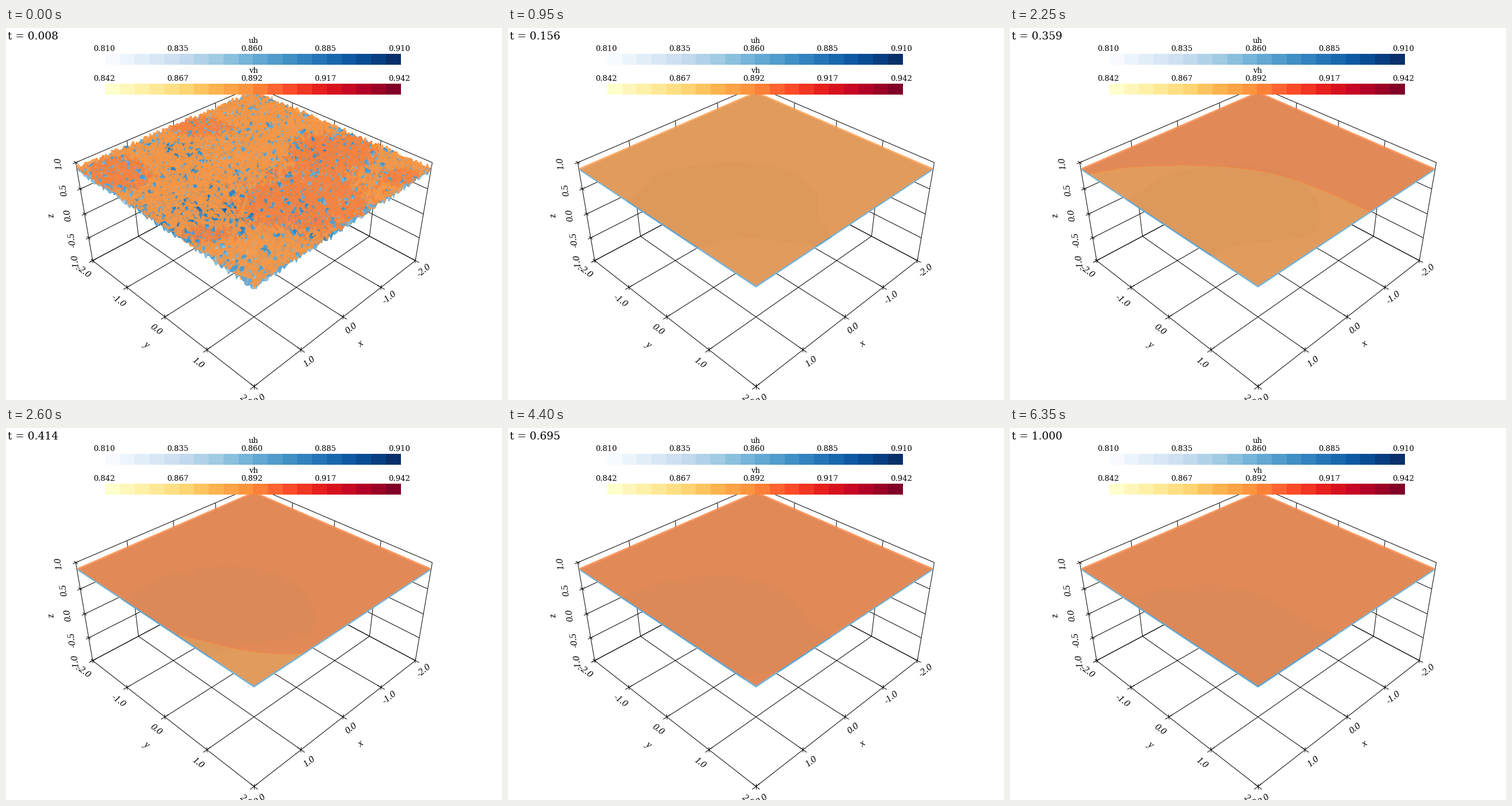
A matplotlib script that plays this animation: 864x648 px, repeating every 6400 ms.

```python
import numpy as np
import matplotlib.pyplot as plt
from matplotlib import colormaps
from matplotlib.animation import FuncAnimation
from matplotlib.collections import LineCollection, PolyCollection
from matplotlib.patches import Polygon, Rectangle
from matplotlib.path import Path

W, H, DPI = 864, 648, 100
FRAMES, STEP = 128, 50
BINS = 20
ROUGH = 8            # frames drawn with the noisy mesh
ALPHA = 0.8
U0, V0 = 0.860, 0.892
BLUES = colormaps["Blues"].resampled(BINS)
REDS = colormaps["YlOrRd"].resampled(BINS)

# isometric camera, 30 degree view angle, fitted to the box
DIST = 3 / np.sin(np.radians(15))
FOCAL = H / 2 / np.tan(np.radians(15))


def project(x, y, z):
    x, y, z = np.broadcast_arrays(x, y, z)
    w = FOCAL / (DIST - (x + y + z) / np.sqrt(3))
    return np.stack([W / 2 + w * (y - x) / np.sqrt(2),
                     H / 2 - w * (2 * z - x - y) / np.sqrt(6)], axis=-1)


def px(size):
    return size * 72 / DPI


def smooth(pts, n=14):
    """Catmull-Rom curve through the points."""
    p = np.vstack([2 * pts[0] - pts[1], pts, 2 * pts[-1] - pts[-2]])
    t = np.linspace(0, 1, n)[:, None]
    parts = []
    for a, b, c, d in zip(p, p[1:], p[2:], p[3:]):
        parts.append(0.5 * (2 * b + (c - a) * t + (2 * a - 5 * b + 4 * c - d) * t**2
                            + (3 * b - a - 3 * c + d) * t**3))
    return np.vstack(parts)


def blend(times, keys, ms):
    k = int(np.clip(np.searchsorted(times, ms) - 1, 0, len(times) - 2))
    f = np.clip((ms - times[k]) / (times[k + 1] - times[k]), 0, 1)
    a, b = np.array(keys[k], float), np.array(keys[k + 1], float)
    return smooth(a + (b - a) * f)


U_TIMES = [950, 1750, 3000, 4400, 6350]
U_KEYS = [
    [(195, 310), (228, 286), (265, 252), (390, 234), (490, 250), (537, 288),
     (543, 335), (575, 382), (520, 378), (435, 367), (375, 371), (315, 388)],
    [(195, 308), (228, 288), (270, 252), (390, 236), (490, 254), (537, 295),
     (541, 335), (525, 360), (490, 367), (430, 371), (380, 378), (330, 396)],
    [(190, 303), (225, 283), (285, 257), (385, 243), (470, 256), (522, 296),
     (536, 338), (525, 360), (490, 369), (430, 378), (392, 388), (350, 412)],
    [(190, 300), (220, 285), (285, 264), (370, 257), (440, 266), (495, 295),
     (528, 340), (575, 380), (500, 418), (455, 426), (432, 428), (405, 442)],
    [(185, 300), (215, 293), (270, 279), (345, 273), (410, 281), (465, 305),
     (525, 342), (580, 372), (520, 430), (470, 460), (440, 480), (380, 470)],
]
V_TIMES = [1300, 1750, 2250, 2800]
V_KEYS = [
    [(400, 85), (415, 95), (425, 102), (435, 105),
     (445, 105), (455, 100), (465, 95), (475, 90)],
    [(270, 160), (295, 178), (350, 192), (450, 201),
     (550, 208), (620, 218), (665, 214), (685, 205)],
    [(110, 262), (150, 252), (215, 242), (310, 239),
     (400, 244), (480, 259), (560, 289), (640, 326)],
    [(150, 330), (200, 370), (280, 410), (380, 450),
     (432, 470), (500, 470), (560, 440), (640, 380)],
]

fig = plt.figure(figsize=(W / DPI, H / DPI), dpi=DPI, facecolor="white")
ax = fig.add_axes([0, 0, 1, 1])
ax.set_xlim(0, W)
ax.set_ylim(H, 0)
ax.axis("off")


# ---- box, grid and ticks
def segment(a, b):
    return project(*np.array([a, b], float).T)


lines = []
for c in range(-2, 3):
    lines += [segment((c, -2, -1), (c, 2, -1)), segment((-2, c, -1), (2, c, -1)),
              segment((c, -2, -1), (c, -2, 1)), segment((-2, c, -1), (-2, c, 1))]
    z, r, q = c / 2, 0.075, 0.055
    lines += [segment((2, -2, z), (-2, -2, z)), segment((-2, 2, z), (-2, -2, z))]
    lines += [segment((2 - r, c, -1), (2 + r, c, -1)),
              segment((2, c, -1 - q), (2, c, -1 + q)),
              segment((c, 2 - r, -1), (c, 2 + r, -1)),
              segment((c, 2, -1 - q), (c, 2, -1 + q)),
              segment((2 - q, -2, z), (2 + q, -2, z)),
              segment((2, -2 - q, z), (2, -2 + q, z))]
ax.add_collection(LineCollection(lines, colors="black", linewidths=px(1), zorder=1))


def axis_text(x, y, text, angle):
    ax.text(x, y, text, rotation=angle, ha="center", va="center", zorder=2,
            family="Liberation Serif", style="italic", size=px(17))


Y_POS = [(134, 424), (195, 475), (261, 525), (334, 583), (418, 648)]
X_POS = [(728, 423), (668, 470), (601, 523), (528, 581), (443, 647)]
Z_POS = [(122, 408), (116, 369), (108, 326), (101, 282), (92, 236)]
for k in range(5):
    axis_text(*Y_POS[k], f"{k - 2:.1f}", -38)
    axis_text(*X_POS[k], f"{k - 2:.1f}", 38)
    axis_text(*Z_POS[k], f"{k / 2 - 1:.1f}", 98)
axis_text(244, 551, "y", -38)
axis_text(618, 551, "x", 38)
axis_text(80, 327, "z", 98)


# ---- colour bars and clock
def label(x, y, text, size=13.3, ha="center"):
    return ax.text(x, y, text, ha=ha, va="baseline", zorder=9,
                   family="DejaVu Serif", size=px(size))


def colorbar(name, cmap, low, top, height):
    left, cell = 173, 514.5 / BINS
    for k in range(BINS):
        ax.add_patch(Rectangle((left + k * cell, top), cell, height, lw=0,
                               color=cmap(k), antialiased=False, zorder=8))
    label(431, top - 19, name)
    for k in range(5):
        label(171 + 128.5 * k, top - 5.5, f"{low + 0.025 * k + 1e-9:.3f}")


colorbar("uh", BLUES, 0.810, 45, 19)
colorbar("vh", REDS, 0.842, 97, 18.5)
clock = label(3, 19.5, "", 18.6, "left")


# ---- smooth sheets
def sheet(z):
    return project(np.array([2, 2, -2, -2]), np.array([-2, 2, 2, -2]), z)


def region(color, clip, **kw):
    p = Polygon(sheet(U0), facecolor=color, edgecolor="none", lw=0, **kw)
    ax.add_patch(p)
    p.set_clip_path(clip)
    return p


u_base = ax.add_patch(Polygon(sheet(U0), facecolor=BLUES(9), lw=0, zorder=3))
v_clip = ax.add_patch(Polygon(sheet(V0), facecolor="none", lw=0, zorder=3))
u_dark = region(BLUES(10), u_base, zorder=4)
v_low = region(REDS(9), v_clip, alpha=ALPHA, antialiased=False, zorder=5)
v_high = region(REDS(10), v_clip, alpha=ALPHA, antialiased=False, zorder=5)
flat = [u_base, u_dark, v_low, v_high]

# ---- noisy mesh
N = 100
rng = np.random.default_rng(7)
grid = np.linspace(-2, 2, N + 1)
GX, GY = np.meshgrid(grid, grid)
u_noise, v_noise = rng.uniform(-1, 1, (2, N + 1, N + 1))
grain = rng.normal(0, 0.1, N * N)
mesh = ax.add_collection(PolyCollection([], edgecolors="none", linewidths=0,
                                        antialiaseds=False, zorder=6))


def quads(a):
    return np.stack([a[:-1, :-1], a[:-1, 1:], a[1:, 1:], a[1:, :-1]], axis=2)


def cell_mean(a):
    return quads(a).mean(axis=2).ravel()


def blobs(p, spots):
    return sum(np.exp(-((p[:, 0] - x) / rx)**2 - ((p[:, 1] - y) / ry)**2)
               for x, y, rx, ry in spots)


V_SPOTS = [(520, 305, 115, 52), (570, 215, 75, 32), (335, 174, 60, 16),
           (195, 255, 60, 30), (345, 362, 42, 12), (690, 262, 32, 14)]
U_SPOTS = [(365, 320, 55, 32), (550, 362, 35, 16), (300, 212, 40, 22),
           (550, 215, 60, 25), (260, 350, 40, 20)]
DEPTH = cell_mean(GX + GY)
CENTER = project(cell_mean(GX), cell_mean(GY), V0)
U_MASK = Path(blend(U_TIMES, U_KEYS, 0)).contains_points(CENTER)
V_FIELD = blobs(CENTER, V_SPOTS)
U_FIELD = blobs(CENTER, U_SPOTS)


def draw_mesh(i):
    fade = 0.5**i
    zu, zv = U0 + 0.06 * fade * u_noise, V0 + 0.06 * fade * v_noise
    verts = np.concatenate([quads(project(GX, GY, z)).reshape(-1, 4, 2)
                            for z in (zu, zv)])
    u_bin = 9 + U_MASK + fade * (2 * U_FIELD + 4 * cell_mean(u_noise))
    v_bin = 9 + (V_FIELD + fade * grain > 0.4 + 0.13 * i)
    colors = np.concatenate([BLUES(np.rint(u_bin).astype(int)),
                             REDS(v_bin.astype(int), alpha=ALPHA)])
    height = np.concatenate([cell_mean(zu), cell_mean(zv)])
    order = np.lexsort((height, np.round(np.tile(DEPTH, 2), 6)))
    mesh.set_verts(verts[order])
    mesh.set_facecolor(colors[order])


def draw_flat(ms):
    u_dark.set_xy(blend(U_TIMES, U_KEYS, ms))
    front = blend(V_TIMES, V_KEYS, ms)
    for patch, edge in ((v_high, -50), (v_low, H + 50)):
        frame = [(W + 50, front[-1, 1]), (W + 50, edge), (-50, edge), (-50, front[0, 1])]
        patch.set_xy(np.vstack([front, frame]))


def draw(i):
    rough = i < ROUGH
    mesh.set_visible(rough)
    for patch in flat:
        patch.set_visible(not rough)
    if rough:
        draw_mesh(i)
    else:
        draw_flat(i * STEP)
    clock.set_text(f"t = {(i + 1) / FRAMES:.3f}")
    return [mesh, clock, *flat]


anim = FuncAnimation(fig, draw, frames=FRAMES, interval=STEP, repeat=True)
plt.show()
```
